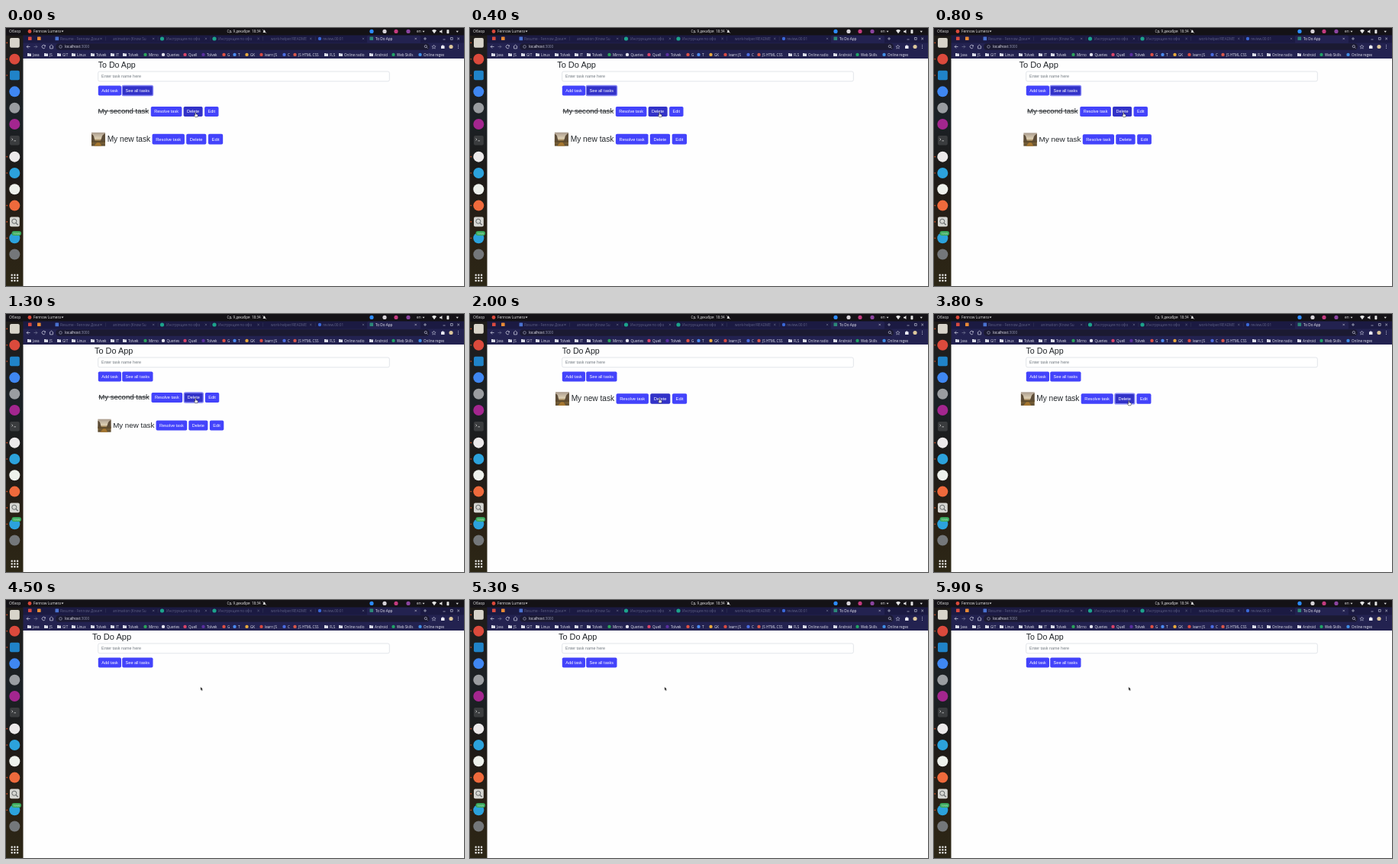
These frames come from a looping animation (600x338 px, 6 s). An HTML page:

```html
<!DOCTYPE html>
<html lang="en">
<head>
<meta charset="utf-8">
<title>To Do App</title>
<style>
html, body { margin: 0; width: 100%; height: 100%; overflow: hidden; background: #fefefe; }
svg { display: block; width: 600px; height: 338px; }
text { white-space: pre; }
.ui { font-family: "Open Sans", "Noto Sans", sans-serif; }
.page { font-family: "Liberation Sans", Arial, sans-serif; }
</style>
</head>
<body>
<svg id="stage" viewBox="0 0 600 338">
  <defs>
    <linearGradient id="wall" x1="0" y1="0" x2="0" y2="1">
      <stop offset="0" stop-color="#1f1c19"/>
      <stop offset=".33" stop-color="#1b2126"/>
      <stop offset=".55" stop-color="#1d1a18"/>
      <stop offset=".8" stop-color="#2a2115"/>
      <stop offset="1" stop-color="#2c2716"/>
    </linearGradient>
    <linearGradient id="sky" x1="0" y1="0" x2="0" y2="1">
      <stop offset="0" stop-color="#a99b8d"/>
      <stop offset=".45" stop-color="#ded0b4"/>
      <stop offset=".62" stop-color="#8a6c3c"/>
      <stop offset="1" stop-color="#58492f"/>
    </linearGradient>
  </defs>
  <g id="chrome" class="ui"></g>
  <g id="page" class="page"></g>
</svg>
<script>
const NS = "http://www.w3.org/2000/svg";
const chrome = document.getElementById("chrome");
const page = document.getElementById("page");

function el(parent, tag, attrs, content) {
  const node = document.createElementNS(NS, tag);
  for (const key in attrs) node.setAttribute(key, attrs[key]);
  if (content) node.textContent = content;
  parent.appendChild(node);
  return node;
}
const box = (p, x, y, width, height, fill, rx = 0, more = {}) =>
  el(p, "rect", { x, y, width, height, fill, rx, ...more });
const dot = (p, cx, cy, r, fill) => el(p, "circle", { cx, cy, r, fill });
const line = (p, d, stroke, width = 0.7) =>
  el(p, "path", { d, stroke, "stroke-width": width, fill: "none" });
const shape = (p, d, fill) => el(p, "path", { d, fill });
const label = (p, x, y, size, fill, words) =>
  el(p, "text", { x, y, "font-size": size, fill }, words);

function drawTopBar() {
  box(chrome, 0, 0, 600, 10, "#141216");
  label(chrome, 4, 6.2, 5, "#e4e4e4", "Обзор");
  dot(chrome, 31, 4.5, 2.4, "#db4a3c");
  label(chrome, 36, 6.2, 4.8, "#e4e4e4", "Fennow Lumera");
  shape(chrome, "M72.5 3.5h3l-1.5 2z", "#d8d8d8");
  label(chrome, 289.5, 6, 4.6, "#ececec", "Ср, 9 декабря  18:34");
  shape(chrome, "M336.4 6q1-1 1-2.6 1-1.8 2 0 0 1.6 1 2.6z", "#e0e0e0");
  line(chrome, "M336 1.8l5 5", "#e0e0e0", 0.6);
  [[479, "#2d8cff"], [496, "#d7d3d8"], [511, "#c43b80"], [527, "#8c45a0"]]
    .forEach(([x, color]) => dot(chrome, x, 4.4, 2.6, color));
  label(chrome, 538, 6.2, 4.8, "#e4e4e4", "en");
  shape(chrome, "M545.5 3.7h3l-1.5 2z", "#d8d8d8");
  shape(chrome, "M558 3.2q3-2.2 6 0l-3 4z", "#e4e4e4");
  shape(chrome, "M568 3.8h1.4l2-1.7v5l-2-1.7H568z", "#e4e4e4");
  box(chrome, 577.4, 2.2, 3, 5, "#e4e4e4", 0.6);
  shape(chrome, "M589.5 3.7h3.4l-1.7 2.2z", "#d8d8d8");
}

function drawTabs() {
  box(chrome, 22, 9.5, 578, 11, "#1b1a42");
  box(chrome, 473, 9.8, 70, 11, "#232250", 2);
  box(chrome, 29, 11.5, 4.6, 4.6, "#d94b40", 0.6);
  box(chrome, 41, 11.5, 4.6, 4.6, "#e88a36", 0.6);
  box(chrome, 64.5, 11.5, 4.6, 4.8, "#4a72d0", 0.6);
  dot(chrome, 204.5, 14, 2.6, "#1da38b");
  dot(chrome, 273, 14, 2.6, "#1da38b");
  dot(chrome, 411, 14, 2.2, "#3a68d6");
  box(chrome, 476.5, 11.5, 4.6, 4.6, "#2c8878", 0.6);
  [[71, "Resume - Fennow Доки"], [140, "animation (Know Su"], [210, "Инструкция по офо"],
   [278, "Инструкция по офо"], [347, "work-helper/README"], [415, "review.00:01"]]
    .forEach(([x, words]) => label(chrome, x, 15.8, 4.7, "#5f6184", words));
  label(chrome, 484, 15.6, 4.7, "#eeeef6", "To Do App");
  for (let i = 0; i < 7; i++) {
    const x = 124.5 + i * 68.7;
    line(chrome, `M${x - 1.2} 12.8l2.4 2.4m0-2.4l-2.4 2.4`, i === 6 ? "#d8d8e4" : "#777a94", 0.5);
    if (i < 5) line(chrome, `M${x + 6} 11.5v5`, "#3c3e5c", 0.5);
  }
  line(chrome, "M547 14h4m-2-2v4", "#d6d8e8", 0.6);
  line(chrome, "M572.5 15h3M582.4 12.5h2.8v2.8h-2.8zM591.2 12.6l2.8 2.8m0-2.8l-2.8 2.8", "#d6d8e8", 0.6);
}

function drawToolbar() {
  box(chrome, 22, 19.5, 578, 20.5, "#232250");
  box(chrome, 65, 20.2, 490, 8.6, "#1b1a32", 4.3);
  line(chrome, "M31.5 24.5h-4.4m2-2l-2 2 2 2", "#d8daea");
  line(chrome, "M36.5 24.5h4.4m-2-2l2 2-2 2", "#777a98");
  line(chrome, "M51.3 23.5a2.2 2.2 0 1 0 0 2m.2-3v1.4h-1.6", "#d8daea");
  line(chrome, "M56.8 24.5l2.7-2.4 2.7 2.4m-4.6-.4v2.8h3.8v-2.8", "#d8daea");
  el(chrome, "circle", { cx: 71.5, cy: 24.5, r: 1.8, fill: "none", stroke: "#b8bad0", "stroke-width": 0.6 });
  const url = label(chrome, 77, 26.1, 4.8, "#f0f0f8", "localhost");
  el(url, "tspan", { fill: "#8d90ac" }, ":3000");
  el(chrome, "circle", { cx: 549.8, cy: 24.1, r: 1.6, fill: "none", stroke: "#d0d2e4", "stroke-width": 0.6 });
  line(chrome, "M551 25.3l1.4 1.4", "#d0d2e4");
  line(chrome, "M560.5 22.1l.8 1.8 1.8.1-1.4 1.3.5 1.8-1.7-1-1.7 1 .5-1.8-1.4-1.3 1.8-.1z", "#d0d2e4", 0.5);
  shape(chrome, "M570 23.2h1.3a.9.9 0 0 1 1.8 0h1.4v3.8H570z", "#ececf6");
  dot(chrome, 583, 24.5, 2.6, "#dcc79c");
  [22.5, 24.5, 26.5].forEach(y => dot(chrome, 592.5, y, 0.5, "#d8daea"));
}

function drawBookmarks() {
  [[35, "Java"], [57, "JS"], [74, "GIT"], [93, "Linux"], [118, "Tolvek"], [144, "IT"],
   [160, "Tolvek"], [187, "Mirno", "#2ba35a"], [210.5, "Queries", "#e4e4ee"],
   [239, "Quell", "#d94468"], [263, "Tolvek", "#5a2fa0"], [290, "G", "#de5044"], [304, "T", "#4a8af0"],
   [320, "GK", "#e8a93c"], [339, "learn JS", "#d84a42"], [369, "C", "#4a6ce0"],
   [383, "JS HTML CSS", "#d8574a"], [424, "FLS"], [443, "Online radio"], [483, "Android"],
   [512, "Web Skills", "#21a366"], [547, "Online regex", "#3f8ee6"]]
    .forEach(([x, words, color]) => {
      if (color) dot(chrome, x - 4.5, 34.9, 2.2, color);
      else shape(chrome, `M${x - 7} 32.9h2l.6.7h2.4v3.4h-5z`, "#dadce8");
      label(chrome, x, 36.7, 4.6, "#e6e7f2", words);
    });
}

function drawDock() {
  box(chrome, 0, 10, 22.5, 328, "url(#wall)");
  const icons = ["#d8d4ca", "#db4a3c", "#2083c8", "#3f87f2", "#9a9da1", "#a3268f", "#3a3c3e",
    "#ece9ea", "#2ca2dc", "#eef1ec", "#ef6a3c", "#d6d6d2", "#2ca2dc", "#74777a"];
  const square = [0, 2, 6, 11];
  icons.forEach((color, i) => {
    const y = 19.4 + i * 21.32;
    if (square.includes(i)) box(chrome, 5, y - 6.3, 12.8, 12.6, color, 2);
    else dot(chrome, 11.3, y, 7, color);
    if ([0, 1, 2, 7, 8, 10, 11, 12].includes(i)) dot(chrome, 1.3, y, 0.8, "#e2572b");
  });
  line(chrome, "M7.4 144.6l1.6 1.4-1.6 1.4m3 .4h2.6", "#c8c8c8", 0.8);
  el(chrome, "circle", { cx: 10.8, cy: 253.2, r: 3, fill: "none", stroke: "#646868", "stroke-width": 1 });
  line(chrome, "M13 255.4l2.6 2.6", "#646868", 1.2);
  box(chrome, 7.5, 266, 12.5, 6, "#38a85b", 3);
  label(chrome, 9, 270.6, 4, "#d8f2df", "1999");
  for (let i = 0; i < 9; i++)
    box(chrome, 6.6 + (i % 3) * 3.7, 322.6 + Math.floor(i / 3) * 3.7, 2.2, 2.2, "#f0f0f0", 0.4);
}

function button(parent, x, y, width, words) {
  const rect = box(parent, x, y, width, 13, "#4343fb", 1.8);
  label(parent, x + 4.4, y + 8.4, 5.55, "#fff", words);
  return (hover, focus) => {
    rect.setAttribute("fill", hover || focus ? "#3232c8" : "#4343fb");
    rect.setAttribute("stroke", focus ? "#8585f6" : "none");
    rect.setAttribute("stroke-width", 1.4);
  };
}

function taskButtons(parent, x, y) {
  button(parent, x, y, 40.6, "Resolve task");
  const paintDelete = button(parent, x + 42.8, y, 25, "Delete");
  button(parent, x + 70.3, y, 18.4, "Edit");
  return paintDelete;
}

function photo(parent, x, y) {
  const g = el(parent, "g", { transform: `translate(${x} ${y})` });
  box(g, 0, 0, 17.2, 17, "url(#sky)");
  shape(g, "M0 2q3 1 3.5 5l1 4H0zM17.2 1q-4 2-4.5 6l-1.5 4h6z", "#5c4c38");
  shape(g, "M0 10.5h17.2v2H0z", "#5d4a2c");
  shape(g, "M7 12.5h3l3 4.5H3z", "#a5762f");
}

drawTopBar();
drawTabs();
drawToolbar();
drawBookmarks();
drawDock();

const heading = el(page, "g", {});
label(heading, 120.7, 51.6, 10.65, "#212529", "To Do App");
box(page, 120.7, 57, 381.6, 12.8, "#fff", 2, { stroke: "#ced4da", "stroke-width": 0.6 });
label(page, 125, 65.3, 5.45, "#717980", "Enter task name here");
button(page, 120.8, 75.5, 30.2, "Add task");
const paintSeeAll = button(page, 152.2, 75.5, 40.3, "See all tasks");

const doneRow = el(page, "g", {});
label(doneRow, 120.5, 112.2, 9.6, "#212529", "My second task");
line(doneRow, "M120.5 108.9h66.5", "#212529", 0.8);
const paintDoneDelete = taskButtons(doneRow, 189.8, 103);

const newRow = el(page, "g", {});
photo(newRow, 120.4, 137.7);
label(newRow, 140.2, 149.2, 9.75, "#212529", "My new task");
const paintNewDelete = taskButtons(newRow, 196.6, 139.6);

const hand = el(page, "path", {
  d: "M-.6 0q.6-.8 1.2 0v2l2 .6q.7.3.5 1.2l-.5 2H-.6L-2 3.6q.2-.8 1.4 0z",
  fill: "#fff", stroke: "#111", "stroke-width": 0.5
});
const arrow = el(page, "path", {
  d: "M-.4-.2v4.6l1-.9.8 1.7.8-.4-.8-1.6h1.4z",
  fill: "#111", stroke: "#fff", "stroke-width": 0.3
});

// CSS "ease": cubic-bezier(.25, .1, .25, 1)
function ease(x) {
  let lo = 0, hi = 1;
  for (let i = 0; i < 24; i++) {
    const u = (lo + hi) / 2, v = 1 - u;
    if (0.75 * v * u + u * u * u < x) lo = u; else hi = u;
  }
  const u = lo, v = 1 - u;
  return 0.3 * v * v * u + 3 * v * u * u + u * u * u;
}
function pulse(ms) {
  const phase = (ms % 2000) / 1000;
  return phase < 1 ? ease(phase) : 1 - ease(phase - 1);
}
const grow = (p, cx, cy) => {
  const s = 1 + 0.05 * p;
  return `translate(${cx * (1 - s)} ${cy * (1 - s)}) scale(${s})`;
};
const show = (node, on) => node.setAttribute("display", on ? "inline" : "none");

const LOOP = 6000, CENTER = 311;
const TICKS = [0, 2, 4, 5, 7, 8, 10, 12, 13, 15, 17, 18, 20, 22, 24, 25, 26, 27, 29, 30, 32, 34,
  35, 37, 38, 40, 42, 43, 45, 46, 48, 50, 51, 53, 54, 56, 58, 59];

function draw(time) {
  const now = time % LOOP;
  const t = 100 * TICKS.filter(k => k * 100 <= now).pop();
  const hasDone = t < 1800, hasNew = t < 4300;

  heading.setAttribute("transform", grow(pulse(t), CENTER, 47.5));
  show(doneRow, hasDone);
  doneRow.setAttribute("transform", `translate(${1.5 * pulse(t)} 0)`);
  show(newRow, hasNew);
  newRow.setAttribute("transform",
    `translate(0 ${hasDone ? 0 : -34.7}) ` + grow(pulse(t + 600), CENTER, 157));

  paintSeeAll(false, t < 1200);
  paintDoneDelete(true, t >= 1200);
  paintNewDelete(!hasDone, t >= 3700);

  const move = Math.min(1, Math.max(0, (t - 2300) / 400));
  const at = `translate(${248.3 + 7 * move} ${110.8 + 3.2 * move})`;
  hand.setAttribute("transform", at);
  arrow.setAttribute("transform", at);
  show(hand, hasNew);
  show(arrow, !hasNew);
}

const start = performance.now();
function loop() {
  draw(performance.now() - start);
  requestAnimationFrame(loop);
}
loop();
</script>
</body>
</html>
```
